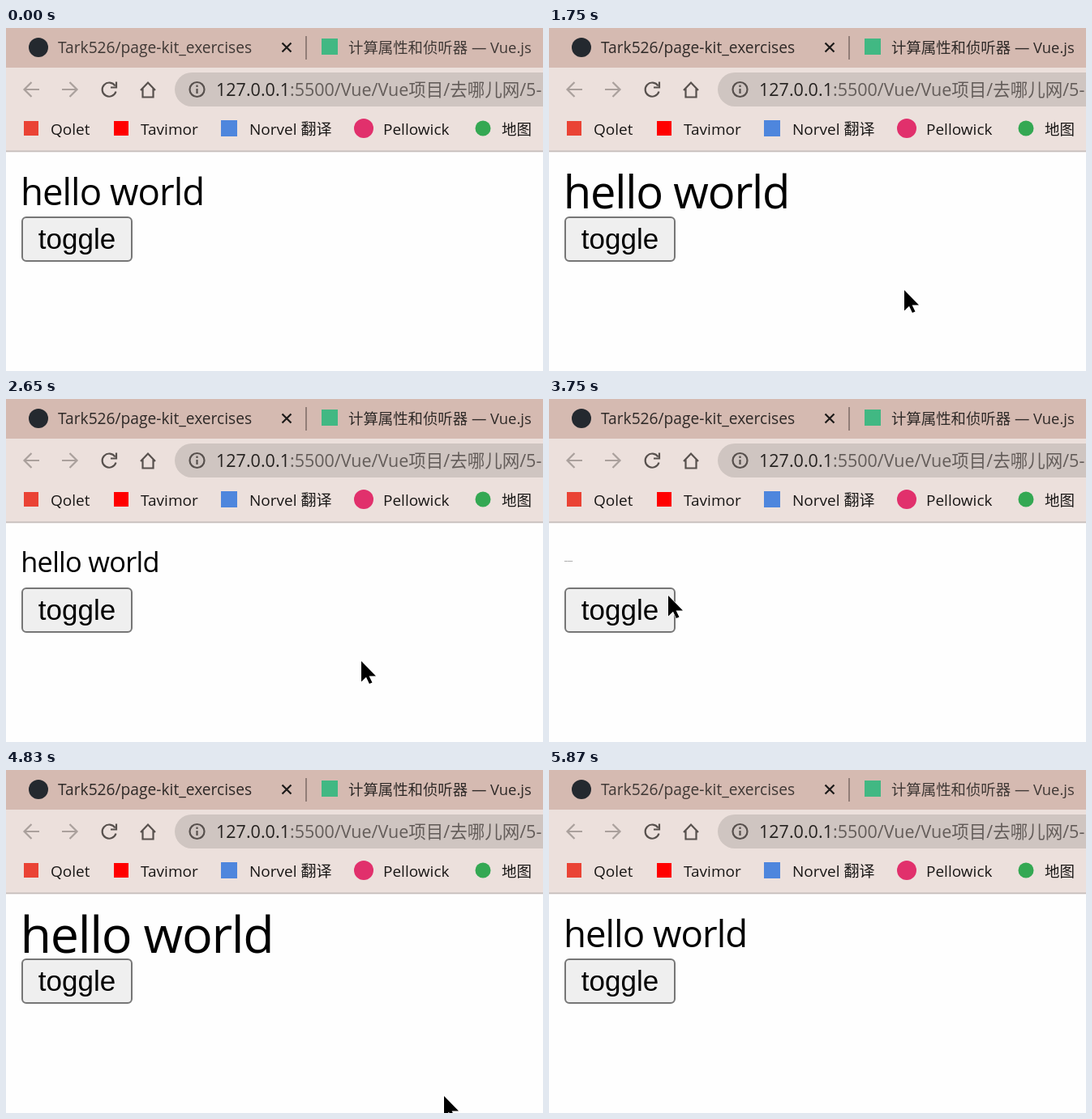
An HTML page that plays this animation: 662 by 424 pixels, repeating every 5.9 s.

```html
<!DOCTYPE html>
<html lang="zh-CN">
<head>
<meta charset="utf-8">
<title>toggle</title>
<style>
  html, body { margin: 0; width: 100%; height: 100%; overflow: hidden; background: #fefefe; }
  svg { display: block; width: 662px; height: 424px; }
  text { font-family: "Open Sans", "Noto Sans CJK SC", "Noto Sans CJK", sans-serif; }
  .marks text { font-size: 19px; fill: #191716; }
  .icon { fill: none; stroke: #57504d; stroke-width: 2.2; }
  .off { stroke: #aaa09c; }
  #label { font-family: "Liberation Sans", Arial, sans-serif; font-size: 35px; text-anchor: middle; }
  #hello { font-size: 45.5px; letter-spacing: -.95px; }
</style>
</head>
<body>
<svg viewBox="0 0 662 424">
  <rect width="662" height="424" fill="#fefefe"/>
  <rect width="662" height="49" fill="#d5bab1"/>
  <rect y="49" width="662" height="103" fill="#ece0dc"/>
  <rect y="151.5" width="662" height="1.8" fill="#c5bebb"/>

  <circle cx="40" cy="24" r="12" fill="#24292f"/>
  <g id="tabs">
    <text x="64" y="31" font-size="19.2">Tark526/page-kit_exercises</text>
    <text x="422" y="31" font-size="18.4">计算属性和侦听器 — Vue.js</text>
  </g>
  <path d="M340.5 18.5l11 11m0-11l-11 11" stroke="#1c1a19" stroke-width="2.2"/>
  <path d="M370 10v29" stroke="#806f69" stroke-width="1.6"/>
  <rect x="389" y="13" width="20" height="20" fill="#41b883"/>

  <g class="icon">
    <path class="off" d="M41 76H23m8.5-9l-9 9l9 9M69 76h18m-8.500-9l9 9l-9 9"/>
    <path d="M134.500 71.500a8.600 8.600 0 1 0 1 7M136 66.500v7h-7"/>
    <path d="M166 77l9-9.500l9 9.500M168.500 75v10.500h13V75"/>
  </g>
  <rect x="208" y="55" width="500" height="42" rx="21" fill="#cfc5c1"/>
  <g class="icon">
    <circle cx="235.500" cy="76" r="9"/>
    <path d="M235.500 75v6m0-10.500v2.400"/>
  </g>
  <text x="259" y="84" font-size="21.5" fill="#635c59"><tspan fill="#24211f">127.0.0.1</tspan>:5500/Vue/Vue项目/去哪儿网/5-</text>

  <g class="marks">
    <rect x="22" y="115" width="18" height="18" fill="#ea4335"/>
    <text x="55" y="132">Qolet</text>
    <rect x="133" y="115" width="18" height="18" fill="#ff0000"/>
    <text x="166" y="132">Tavimor</text>
    <rect x="265" y="114" width="20" height="20" fill="#4e86dd"/>
    <text x="300" y="132">Norvel 翻译</text>
    <circle cx="441" cy="124" r="12" fill="#e1306c"/>
    <text x="465" y="132">Pellowick</text>
    <circle cx="588" cy="124" r="9.500" fill="#34a853"/>
    <text x="611" y="132" style="font-size:18.5px">地图</text>
  </g>

  <text id="hello" x="18" y="219">hello world</text>
  <g id="button">
    <rect id="face" x="20" y="234" width="135" height="54" rx="5" stroke-width="2"/>
    <text id="label" x="87.500" y="273">toggle</text>
  </g>
  <path id="cursor" d="M0 0V25.500L6 19.800L9.900 28L13.500 26.500L9.600 18.500H18Z"
    stroke="#fff" stroke-width="1.2" paint-order="stroke"/>
</svg>
<script>
const LOOP = 5900, HALF = 885;
const LEAVE = 1142, ENTER = 3790, SHOW = 3740;
const GONE = LEAVE + 2 * HALF;
const $ = id => document.getElementById(id);
const within = (t, spans) => spans.some(([a, b]) => t >= a && t < b);

const speed = {
  hold: () => 0,
  in: p => p * p,
  out: p => 1 - (1 - p) ** 2,
  both: p => p * p * (3 - 2 * p)
};

// time, x, y, how it moves on to the next point
const path = [
  [470, 444, 426, "both"],
  [1000, 122, 262, "hold"],
  [1130, 122, 262, "in"],
  [1270, 235, 306, "out"],
  [1600, 438, 324, "hold"],
  [2920, 438, 324, "both"],
  [3560, 118, 214, "hold"],
  [3700, 118, 214, "in"],
  [3750, 147, 243, "hold"],
  [3850, 147, 243, "both"],
  [4110, 540, 403, "hold"],
  [5340, 540, 403, "in"],
  [5570, 556, 428, "hold"]
];

// CSS "ease": cubic-bezier(.25, .1, .25, 1)
function ease(x) {
  const curve = (u, a, b) => 3 * (1 - u) * u * ((1 - u) * a + u * b) + u ** 3;
  let lo = 0, hi = 1;
  for (let i = 0; i < 24; i++) {
    const mid = (lo + hi) / 2;
    if (curve(mid, .25, .25) < x) lo = mid; else hi = mid;
  }
  return curve(lo, .1, 1);
}

// bounce in: 0 to 1.5 to 1
function bounce(ms) {
  const p = Math.min(2, Math.max(0, ms / HALF));
  return p < 1 ? 1.5 * ease(p) : 1.5 - .5 * ease(p - 1);
}

function scaleAt(t) {
  if (t < LEAVE) return 1;
  if (t < GONE) return bounce(GONE - t);
  if (t < SHOW) return 0;
  return t < 3850 ? .045 : bounce(t - ENTER);
}

function cursorAt(t) {
  const i = path.findLastIndex(k => k[0] <= t);
  if (i < 0) return [444, 500];
  const [a, x, y, how] = path[i];
  const [b, nx, ny] = path[i + 1] || [LOOP, x, y];
  const p = speed[how]((t - a) / (b - a));
  return [x + (nx - x) * p, y + (ny - y) * p];
}

function draw(t) {
  const s = scaleAt(t);
  $("hello").setAttribute("transform", `translate(19 200) scale(${s}) translate(-19 -200)`);
  $("hello").style.display = s ? "" : "none";
  $("button").setAttribute("transform", `translate(0 ${t >= GONE && t < SHOW ? -55 : 0})`);

  const press = within(t, [[1060, 1120], [3660, SHOW]]);
  const hover = within(t, [[890, 1180], [3450, SHOW]]);
  $("face").setAttribute("fill", press ? "#f5f5f5" : hover ? "#e5e5e5" : "#efefef");
  $("face").setAttribute("stroke", press ? "#8d8d8d" : hover ? "#4f4f4f" : "#767676");

  $("tabs").setAttribute("fill", within(t, [[1100, 5870]]) ? "#2e2927" : "#3f3835");
  $("cursor").setAttribute("transform", `translate(${cursorAt(t).map(Math.round)})`);
}

const start = performance.now();
function tick(now) {
  draw(Math.max(0, now - start) % LOOP);
  requestAnimationFrame(tick);
}
draw(0);
requestAnimationFrame(tick);
</script>
</body>
</html>
```
